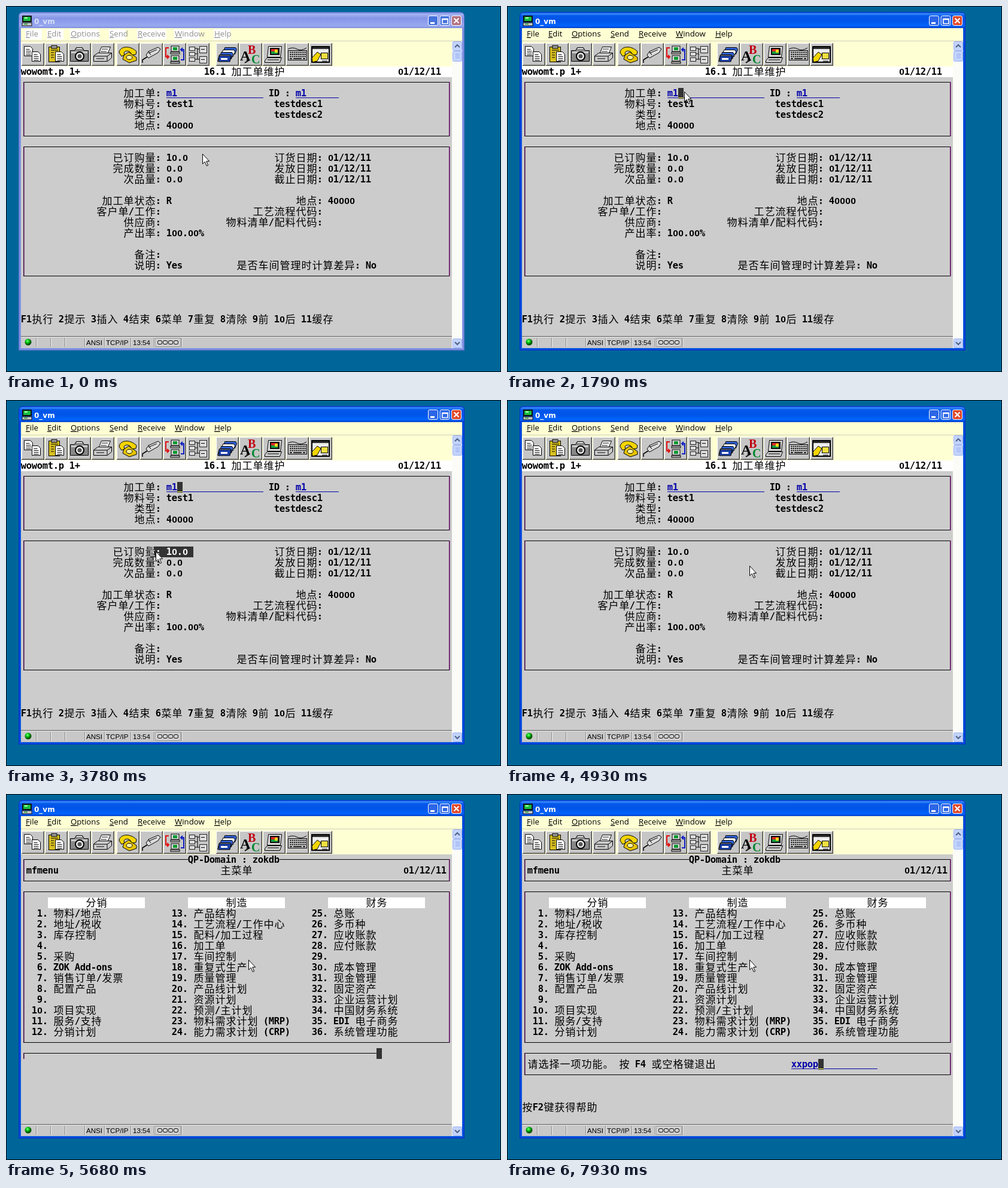
Recreate the animation shown at these times as an HTML page. Size 827 px wide and 612 px high, loop 8000 ms.

```html
<!DOCTYPE html>
<html lang="zh-CN">
<head>
<meta charset="utf-8">
<title>Terminal session</title>
<style>
html, body { margin: 0; width: 100%; height: 100%; overflow: hidden; background: #069; }
svg { display: block; width: 827px; height: 612px; isolation: isolate; }
text { white-space: pre; }
.cell { font: bold 15.5px "DejaVu Sans Mono", monospace; }
.zero { font: bold 15.5px "Liberation Sans", sans-serif; }
.han { font: 300 17px "Noto Sans CJK SC Light", "Noto Sans CJK SC", "Noto Sans CJK", sans-serif; }
.menu { font: 13.2px "Open Sans", sans-serif; }
.title { font: bold 12px "DejaVu Sans", sans-serif; fill: #fff; }
.status { font: 11.6px "Liberation Sans", sans-serif; }
.letter { font: bold 20px "Liberation Serif", serif; }
.invert { fill: #fff; mix-blend-mode: difference; }
.rim { fill: #0a30cf; }
.rim2 { fill: #0855e0; }
.bar { fill: url(#barOn); }
.close { fill: #e0492a; }
.ctl { fill: #2c66e6; }
.item { fill: none; }
.idle .rim { fill: #6476d2; }
.idle .rim2 { fill: #8396e2; }
.idle .bar { fill: url(#barOff); }
.idle .close { fill: #b4717f; }
.idle .ctl { fill: #4672dc; }
.idle .title { fill: #d9e2f8; }
.idle .menu { fill: #8f8f8f; }
.idle .item { fill: #fff; }
</style>
</head>
<body>
<svg id="stage" viewBox="0 0 827 612">
  <defs>
    <linearGradient id="barOn" x2="0" y2="1">
      <stop offset="0" stop-color="#0a52d8"/><stop offset=".08" stop-color="#3a8cff"/>
      <stop offset=".2" stop-color="#0558ea"/><stop offset=".5" stop-color="#0054e8"/>
      <stop offset=".85" stop-color="#0264fc"/><stop offset="1" stop-color="#0040c8"/>
    </linearGradient>
    <linearGradient id="barOff" x2="0" y2="1">
      <stop offset="0" stop-color="#7384dc"/><stop offset=".1" stop-color="#a5b4f2"/>
      <stop offset=".35" stop-color="#8795e6"/><stop offset=".85" stop-color="#98a8f0"/>
      <stop offset="1" stop-color="#7f8fdc"/>
    </linearGradient>
    <radialGradient id="led" cx=".4" cy=".35">
      <stop offset="0" stop-color="#8f8"/><stop offset=".5" stop-color="#0c1"/><stop offset="1" stop-color="#050"/>
    </radialGradient>
  </defs>
  <g id="chrome"></g>
  <g id="form"></g>
  <g id="main"></g>
  <g id="prompt"></g>
  <g id="partial"></g>
  <rect id="select" class="invert" height="18"/>
  <rect id="caret" class="invert" width="9" height="18"/>
  <path id="mouse" d="M.5.5V17L4.3 13.4 7.2 20.3 9.6 19.3 6.8 12.6H11.7Z" fill="#fff" stroke="#000"/>
</svg>
<script>
const $ = id => document.getElementById(id);
const X = c => 25 + 9 * c, Y = r => 101 + 18 * r;

// ---- markup helpers ----
const rect = (x, y, w, h, fill, more = '') =>
  `<rect x="${x}" y="${y}" width="${w}" height="${h}" fill="${fill}" ${more}/>`;
const path = (d, fill = 'none', stroke = '#000', w = 1) =>
  `<path d="${d}" fill="${fill}" stroke="${stroke}" stroke-width="${w}"/>`;
const label = (x, y, s, cls, more = '') => `<text x="${x}" y="${y}" class="${cls}" ${more}>${s}</text>`;
const repeat = (n, fn) => Array.from({ length: n }, (_, i) => fn(i)).join('');

// Text on the 9 x 18 grid; Chinese characters take two cells.
const isHan = ch => ch >= '\u3000';
const cells = s => [...s].reduce((n, ch) => n + (isHan(ch) ? 2 : 1), 0);
function put(c, r, s, fill = '#000') {
  const runs = s.match(/[\u3000-\u9fff]+|0+|[^0\u3000-\u9fff]+/g) || [];
  const spans = runs.map(run => {
    const han = isHan(run), zero = run[0] === '0';
    const xs = [...run].map((_, i) => X(c + i * (han ? 2 : 1)) + (han ? .4 : zero ? .2 : -.2));
    c += cells(run);
    return `<tspan class="${han ? 'han' : zero ? 'zero' : 'cell'}" x="${xs.join(' ')}" y="${Y(r) + (han ? 15 : 14)}">${run}</tspan>`;
  });
  return `<text fill="${fill}">${spans.join('')}</text>`;
}
// Right-aligned caption ending at column c, then its value.
const pair = (c, r, caption, value = '') => put(c - 1 - cells(caption), r, `${caption}: ${value}`);
const INK = '#0000aa';
const field = (c, r, s, len) => put(c, r, s, INK) + rect(X(c), Y(r) + 16, 9 * len, 1, INK);
const frame = (r1, r2) => {
  const top = Y(r1) + 8, h = 18 * (r2 - r1);
  return rect(29, top, 712, 1, '#000') + rect(29, top + h, 712, 1, '#000') +
    rect(29, top, 1.5, h, '#400040') + rect(740, top, 1.6, h + 1, '#5c0a5c');
};

// ---- window ----
function toolIcons() {
  const doc = (x, y) => path(`M${x} ${y}h10l4 4v12h-14z`, '#fff') +
    path(`M${x + 3} ${y + 5}h6m-6 3h8m-8 3h8m-8 3h8`);
  const pc = y => rect(13, y, 13, 9, '#ddd', 'stroke="#000"') +
    rect(16, y + 2, 7, 5, '#0a9a30') + rect(12, y + 10, 15, 3, '#bbb', 'stroke="#000"');
  return [
    doc(4.5, 5.5) + doc(17.5, 14.5),
    rect(6.5, 6.5, 18, 25, '#d8c020', 'stroke="#000"') + rect(11, 4, 9, 5, '#999', 'stroke="#000"') +
      path('M10 12h12m-12 4h5m-5 4h5m-5 4h5') + doc(17.5, 14.5),
    path('M3.5 12.5h7l3-5h10l3 5h7v18h-30z', '#888') + path('M14 9h9', 'none', '#ddd', 2) + rect(5, 14, 27, 3, '#ccc') +
      '<circle cx="19" cy="22" r="7" fill="#eee" stroke="#000" stroke-width="2"/><circle cx="19" cy="22" r="3.5" fill="#555"/>',
    path('M11.5 18.5l5-12h15l-5 12z', '#fff') + path('M17 10h10m-12 4h10') +
      path('M3.5 21.5l7-5h23v8l-7 6h-23z', '#ccc') + path('M4 22h22l7-5m-7 5v8M8 26h13'),
    path('M12 20l8-5 13 9v5l-12 4-11-6z', '#e6c400') + path('M4 16C5 5 22 3 33 14l-1 5-6 1-4-5c-4-3-8-2-10 1l1 4-5 2z', '#f3d500') +
      '<ellipse cx="21" cy="24" rx="5" ry="3.5" fill="#fff5a0" stroke="#000"/>',
    path('M4 33v-5l8-5', 'none', '#000', 1.5) + path('M10 20l4-6 16-7 4 3-4 6-16 9z', '#ddd') + path('M14 17l14-6M14 14l4 6'),
    pc(5) + pc(21) + path('M9 8H4v15h5m-3-3l3 3-3 3', 'none', '#e01010', 2) +
      path('M29 28h5V11h-5m3-3l-3 3 3 3', 'none', '#1020c0', 2),
    repeat(3, i => rect(4.5, 6.5 + 9 * i, 9, 6, '#ddd', 'stroke="#222"')) +
      repeat(2, i => rect(21.5, 5.5 + 17 * i, 12, 11, '#ddd', 'stroke="#222"') + path(`M24 ${10.5 + 17 * i}h6`)) +
      path('M14 9h4v18h-4m0-9h4m0-8h3m-3 17h3'),
    repeat(4, i => path(`M${14.5 - 3 * i} ${7.5 + 4 * i}h18l2 3-3 8h-20z`, i % 2 ? '#fff' : '#3060d0')) +
      path('M5 21h20l-2 10H4z', '#1c40a8') + rect(8, 25, 11, 3, '#fff'),
    label(1, 29, 'A', 'letter', 'style="font-size:24px"') + label(14, 18, 'B', 'letter', 'fill="#c00010"') +
      label(20, 34, 'C', 'letter', 'fill="#008830"') + path('M9 33l8-5', 'none', '#000', 2),
    path('M9.5 5.5h22l-2 18h-22z', '#ddd') + rect(12, 8, 16, 12, '#111') + rect(14, 10, 11, 4, '#e02a20') +
      rect(14, 14, 11, 4, '#10a040') + rect(20, 11, 5, 5, '#f0d820') + path('M3.5 29.5l4-5h24l-3 8h-25z', '#ccc') + path('M8 28h19'),
    path('M3 10q8-4 15 0t16-2') + rect(3.5, 12.5, 31, 16, '#ccc', 'stroke="#000"') +
      repeat(4, i => `<path d="M6 ${15.5 + 3.5 * i}h27" stroke="#222" stroke-width="2.2" stroke-dasharray="${i < 3 ? '2.5 1' : '4 2 14 2'}"/>`),
    rect(4, 6, 29, 26, '#eee', 'stroke="#000" stroke-width="2"') + rect(5, 7, 27, 3, '#333') +
      path('M4 25l9-10 6 4-6 11-8 2z', '#f3d500') + rect(19.5, 16.5, 11, 10, '#f3e040', 'stroke="#000"') + path('M21 30h9'),
  ];
}

function chrome() {
  const cream = '#ffffd4';
  const out = [
    rect(0, 0, 827, 612, '#000'), rect(1, 1, 825, 610, '#006699'),
    '<path class="rim" d="M21 576V18q0-8 8-8h729q8 0 8 8v558z"/>',
    '<path class="rim2" d="M22.5 574.5V18q0-6.5 6.5-6.5h729q6.5 0 6.5 6.5v556.5z"/>',
    '<path class="bar" d="M22 37V18q0-7 7-7h729q7 0 7 7v19z"/>',
    rect(27, 16, 16, 11, '#111'), rect(29, 18, 12, 7, '#18c040'), rect(31, 19, 5, 2, '#b0ffb0'),
    rect(27, 28, 16, 5, '#ccc', 'stroke="#111"'), rect(30, 29.5, 6, 1.5, '#18a030'),
    label(47, 29.5, '0_vm', 'title'),
    rect(25, 37, 737, 64, cream), rect(25, 58, 737, 1, '#d0cfba'),
  ];
  out.push(repeat(3, i =>
    `<rect class="${i < 2 ? 'ctl' : 'close'}" x="${705.5 + 19.5 * i}" y="16.5" width="16" height="16" rx="2.5" stroke="#fff"/>`));
  out.push(rect(709, 27, 7, 3, '#fff'), path('M729 21.5h9v8h-9zM729 22.5h9', 'none', '#fff', 1.6),
    path('M748.5 20.5l8 8m0-8l-8 8', 'none', '#fff', 2.2));
  const menu = { File: 33, Edit: 69, Options: 108, Send: 173, Receive: 220, Window: 282, Help: 348 };
  for (const [s, x] of Object.entries(menu))
    out.push(`<rect class="item" x="${x - 1}" y="39" width="${7 * s.length}" height="17"/>`,
      label(x, 51, `<tspan text-decoration="underline">${s[0]}</tspan>${s.slice(1)}`, 'menu'));

  toolIcons().forEach((icon, i) => {
    const x = 26 + 39 * i + (i > 3 ? 3 : 0) + (i > 7 ? 10 : 0);
    out.push(`<g transform="translate(${x} 62)">` + rect(0, 0, 38, 38, '#444') + rect(0, 0, 37, 37, '#fff') +
      rect(1, 1, 36, 36, '#888') + rect(1, 1, 35, 35, '#c6c6c6') + icon + '</g>');
  });

  out.push(rect(25, 101, 720, 452, '#cccccc'), rect(745, 59, 17, 513, '#fbfbf8'));
  const knob = (y, h, d) => rect(746.5, y + .5, 15, h, '#c3d3fc', 'rx="2" stroke="#9db4ee"') + path(d, 'none', '#4d6185', 2);
  out.push(knob(59, 15, 'M750 69l4-4 4 4'), knob(556, 15, 'M750 562l4 4 4-4'),
    knob(75, 17, ''), path('M751 80.5h7m-7 3h7m-7 3h7', 'none', '#8ea8ec'));

  out.push(rect(25, 553, 720, 19, '#c8c8c8'), rect(25, 552, 720, 1, '#555'), rect(25, 553, 720, 1, '#eee'));
  for (const x of [50, 74, 98, 131, 164, 208, 247, 293])
    out.push(rect(x, 555, 1, 15, '#888'), rect(x + 1, 555, 1, 15, '#f4f4f4'));
  out.push('<circle cx="37" cy="562" r="5.5" fill="url(#led)"/>',
    label(134, 567, 'ANSI', 'status'), label(167, 567, 'TCP/IP', 'status'), label(212, 567, '13:54', 'status'),
    rect(249.5, 555.5, 42, 14, '#d0d0d0', 'stroke="#999"'),
    repeat(4, i => rect(253.5 + 9 * i, 559.5, 7, 6, 'none', 'rx="2" stroke="#000"')));
  return out.join('');
}

// ---- screens ----
const DATE = '01/12/11';

function form() {
  const left = '加工单,物料号 test1,类型,地点 40000,,,已订购量 10.0,完成数量 0.0,次品量 0.0,,' +
    '加工单状态 R,客户单/工作,供应商,产出率 100.00%,,备注,说明 Yes';
  const right = `订货日期 ${DATE},发放日期 ${DATE},截止日期 ${DATE},,地点 40000,工艺流程代码,物料清单/配料代码`;
  const column = (list, c, r) => list.split(',').map((s, i) => s && pair(c, r + i, ...s.split(' '))).join('');
  return rect(25, 101, 720, 18, '#fff') + frame(1, 6) + frame(7, 19) +
    put(0, 0, 'wowomt.p 1+') + put(34, 0, '16.1 加工单维护') + put(70, 0, DATE) +
    column(left, 26, 2) + column(right, 56, 8) + pair(63, 18, '是否车间管理时计算差异', 'No') +
    put(46, 2, 'ID :') + put(47, 3, 'testdesc1') + put(47, 4, 'testdesc2') +
    put(0, 23, 'F1执行 2提示 3插入 4结束 6菜单 7重复 8清除 9前 10后 11缓存') +
    field(27, 2, 'm1', 18) + field(51, 2, 'm1', 8);
}

function mainMenu() {
  const columns = [
    ['分销', '物料/地点,地址/税收,库存控制,,采购,ZOK Add-ons,销售订单/发票,配置产品,,项目实现,服务/支持,分销计划'],
    ['制造', '产品结构,工艺流程/工作中心,配料/加工过程,加工单,车间控制,重复式生产,质量管理,产品线计划,资源计划,预测/主计划,物料需求计划 (MRP),能力需求计划 (CRP)'],
    ['财务', '总账,多币种,应收账款,应付账款,,成本管理,现金管理,固定资产,企业运营计划,中国财务系统,EDI 电子商务,系统管理功能'],
  ];
  let out = frame(0, 2) + frame(3, 17) + rect(X(31), Y(0) + 1, 153, 16, '#cccccc') +
    put(31, 0, 'QP-Domain : zokdb') + put(1, 1, 'mfmenu') + put(37, 1, '主菜单') + put(71, 1, DATE);
  columns.forEach(([head, items], k) => {
    const c = 26 * k;
    out += rect(X(c + 5), Y(4), 162, 18, '#fff') + put(c + 12, 4, head);
    items.split(',').forEach((s, i) => {
      out += put(c + 2, 5 + i, `${12 * k + i + 1}.`.padStart(3)) + put(c + 6, 5 + i, s);
    });
  });
  return out;
}

$('chrome').innerHTML = chrome();
$('form').innerHTML = form();
$('main').innerHTML = mainMenu();
$('partial').innerHTML = rect(29, 433, 590, 1, '#000') + rect(29, 433, 1.5, 10, '#400040');
$('prompt').innerHTML = frame(18, 20) + put(1, 19, '请选择一项功能。 按 F4 或空格键退出') +
  put(0, 23, '按F2键获得帮助') + '<g id="typed"></g>';

// ---- motion ----
const TICK = 105;  // the pointer is sampled on this beat
const ACTIVE = 1685, CLEAR = 5250, MENU = 5680, PROMPT = 5785;
const stops = [  // tick, x, y
  [0, 328, 247], [1, 325, 249], [6, 325, 249], [7, 322, 253], [14, 267, 144], [18, 306, 142], [20, 306, 142],
  [21, 305, 142], [23, 305, 142], [26, 264, 149], [27, 278, 150], [28, 278, 150], [32, 314, 246],
  [36, 250, 253], [37, 240, 260], [38, 288, 266], [39, 288, 266], [42, 361, 269], [44, 361, 269], [47, 405, 277],
];
const drags = [{ from: 24, to: 32, row: 2, end: 31 }, { from: 34, to: 40, row: 8, end: 32 }];
const caretOff = [[0, ACTIVE], [3990, 4200], [4720, MENU], [7070, 7500]];
const keys = [6430, 6860, 7500, 7500, 7930];

function pointer(tick) {
  const i = stops.findLastIndex(s => s[0] <= tick);
  const a = stops[i], b = stops[i + 1] || a;
  const p = (tick - a[0]) / (b[0] - a[0] || 1);
  return [1, 2].map(k => Math.round(a[k] + (b[k] - a[k]) * p));
}

// A drag covers every cell the pointer has reached since the press.
function selection(tick) {
  const drag = drags.find(d => tick >= d.from && tick < d.to);
  if (!drag) return { width: 0 };
  let start = drag.end;
  for (let k = drag.from; k <= tick; k++)
    start = Math.min(start, Math.floor((pointer(k)[0] - 30) / 9));
  return { x: X(start), y: Y(drag.row), width: 9 * (drag.end - start) };
}

function caret(t, typed) {
  if (t < CLEAR) return [29, 2];
  return t < PROMPT ? [66, 18] : [50 + typed, 19];
}

const show = (id, on) => { $(id).style.display = on ? '' : 'none'; };
const set = (id, attrs) => { for (const k in attrs) $(id).setAttribute(k, attrs[k]); };
let shown = -1;

function draw() {
  const t = performance.now() % 8000;
  const tick = Math.floor((t + 5) / TICK);
  $('stage').classList.toggle('idle', t < ACTIVE);
  show('form', t < CLEAR);
  show('main', t >= MENU);
  show('partial', t >= MENU && t < PROMPT);
  show('prompt', t >= PROMPT);

  set('mouse', { transform: `translate(${pointer(tick)})` });
  set('select', selection(tick));
  const typed = keys.filter(k => k <= t).length;
  const [c, r] = caret(t, typed);
  set('caret', { x: X(c), y: Y(r) });
  show('caret', !caretOff.some(([a, b]) => t >= a && t < b));
  if (typed !== shown) {
    shown = typed;
    $('typed').innerHTML = field(50, 19, 'xxpop'.slice(0, typed), 16);
  }
  requestAnimationFrame(draw);
}
draw();
</script>
</body>
</html>
```
